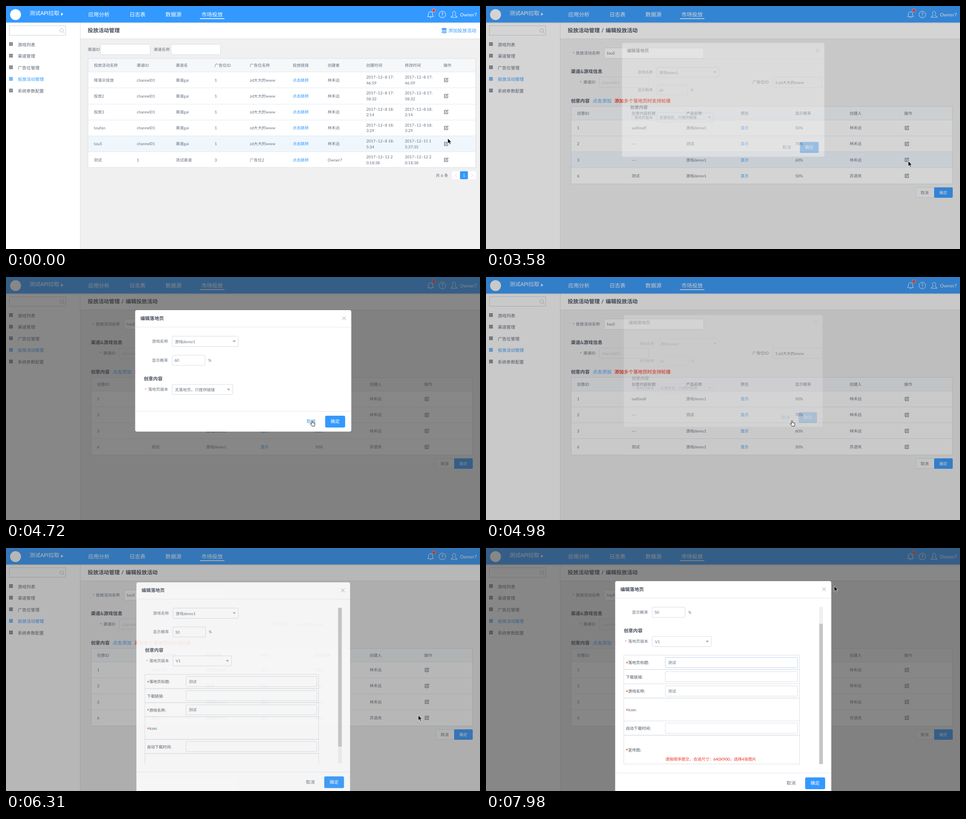
Animation of 1044 by 536 pixels, one loop 8000 ms. Source, as an HTML page:

```html
<!DOCTYPE html>
<html lang="zh-CN">
<head>
<meta charset="utf-8">
<title>投放活动管理</title>
<style>
html, body { margin: 0; width: 100%; height: 100%; overflow: hidden; background: #f0f0f0; }
svg { display: block; width: 1044px; height: 536px; }
text { font-family: Lato, "Noto Sans CJK SC", "Noto Sans CJK", sans-serif; text-rendering: geometricPrecision; white-space: pre; }
</style>
</head>
<body>
<svg id="stage" viewBox="0 0 1044 536" xmlns="http://www.w3.org/2000/svg"></svg>
<script>
const BLUE = '#3399ff', INK = '#657180', DARK = '#464c5b', LINE = '#d7dde4', RED = '#f0321e';
const S = 8.82, M = 10.3, L = 11.76, ROW = 35.2;

// y is the vertical middle of the line
const text = (x, y, s, fill = INK, size = S, weight = 400, extra = '') =>
  `<text x="${x}" y="${(y + size * .38).toFixed(2)}" font-size="${size}" font-weight="${weight}" fill="${fill}" ${extra}>${s}</text>`;
const rect = (x, y, x2, y2, fill, extra = '') =>
  `<rect x="${x}" y="${y}" width="${x2 - x}" height="${y2 - y}" fill="${fill}" ${extra}/>`;
const box = (x, y, x2, y2, fill = '#fff', id = '') =>
  rect(x + .5, y + .5, x2 - .5, y2 - .5, fill, `rx="2" stroke="${LINE}" ${id && `id="${id}"`}`);
const path = (d, stroke, w = 1, extra = '') =>
  `<path d="${d}" fill="none" stroke="${stroke}" stroke-width="${w}" ${extra}/>`;
const hline = (x, x2, y, c = LINE) => path(`M${x} ${y}H${x2}`, c);
const group = (id, inner) => `<g id="${id}">${inner}</g>`;
const star = (x, y, size = S) => text(x, y + 1, '*', RED, size);
const bold = (x, y, s, size = M) => text(x, y, s, DARK, size, 700);
const caret = (x, y) => `<path d="M${x - 3.5} ${y - 2}h7l-3.5 4z" fill="#9ea7b4"/>`;
const editIcon = (x, y) =>
  path('M1 -3.5H-4V4H3.5V.2M-1.4 1.4L-.9 -.6L3.4 -4.6L4.7 -3.3L.6 1Z', '#495060', 1, `transform="translate(${x} ${y})"`);

function cell(x, y, s) {
  if (s === '@') return editIcon(x + 6, y);
  if (s.includes('|')) return s.split('|').map((p, i) => text(x, y - 6.3 + i * 12.6, p)).join('');
  return text(x, y, s, s === '点击跳转' || s === '显示' ? BLUE : INK);
}

function table(x, x2, y, cols, names, rows, mark) {
  const head = 30.3, top = y + head, end = top + rows.length * ROW;
  let out = rect(x, y, x2, end, '#fff') + rect(x, y, x2, top, '#f5f7f9') + mark;
  names.forEach((n, i) => out += text(cols[i], y + head / 2 + .3, n));
  rows.forEach((r, j) => {
    out += hline(x, x2, Math.floor(top + j * ROW) + .5, '#e3e8ee');
    r.forEach((s, i) => out += cell(cols[i], top + (j + .5) * ROW, s));
  });
  return out + rect(x + .5, y + .5, x2 - .5, Math.floor(end) + .5, 'none', `stroke="${LINE}"`);
}

function header() {
  let out = rect(0, 36.5, 1044, 39, '#000', 'opacity=".05"') + rect(0, 0, 1044, 36.5, BLUE);
  out += '<circle cx="21" cy="19" r="12" fill="#fff"/>';
  out += text(52, 16, '测试API拉取', '#fff', L, 500) + '<path d="M121.5 14.5l4.5 3.5-4.5 3.5z" fill="#fff"/>';
  let x = 181;
  for (const s of ['应用分析', '日志表', '数据源', '市场投放']) {
    out += text(x, 18.8, s, '#fff', L, 500);
    x += s.length * L + 44;
  }
  out += rect(427, 27, 481, 28.6, '#fff');
  out += path('M928.5 23.5H941.5Q939.5 22 939.5 17Q939.5 13 935 12.5Q930.5 13 930.5 17Q930.5 22 928.5 23.5ZM933.5 25.5H936.5', '#fff');
  out += '<circle cx="942.3" cy="9.8" r="3.6" fill="#f5372c" stroke="#fff" stroke-width=".6"/>';
  out += '<circle cx="961" cy="18.8" r="7.3" fill="none" stroke="#fff"/>' + text(958.4, 18.8, '?', '#fff', 11.5);
  out += path('M987 12C982 12 983.5 19 985 20.5Q985 21.5 981 23Q980.5 24 980.5 25H993.5Q993.5 24 993 23Q989 21.5 989 20.5C990.5 19 992 12 987 12Z', '#fff');
  return out + text(1000, 18.8, 'Owner7', '#fff', M);
}

function sidebar() {
  let out = rect(0, 36.5, 163, 536, '#fff') + path('M163.5 36.5V536', '#dcdfe3');
  out += rect(7.5, 43.5, 131.5, 64.5, '#fff', 'stroke="#cfd3d8"');
  out += path('M126 57L128.5 60M122.5 50A3.9 3.9 0 1 0 122.6 50', '#b5bac2');
  ['游戏列表', '渠道管理', '广告位管理', '投放活动管理', '系统参数配置'].forEach((s, i) => {
    const y = 85 + i * 25.6, c = i === 3 ? BLUE : '#555d6a';
    for (let k = 0; k < 9; k++) {
      const gx = 7 + k % 3 * 2.8, gy = y - 5 + Math.floor(k / 3) * 2.8;
      out += rect(gx, gy, gx + 2.3, gy + 2.3, c);
    }
    out += text(26, y, s, i === 3 ? BLUE : '#5b6472', 9.55);
  });
  return out;
}

const titleBar = rect(164, 36.5, 1044, 72, '#fff') + hline(164, 1044, 72.5, '#dcdfe3') + bold(180, 54, '投放活动管理', L);

function listPage() {
  const d = s => `2017–12–${s}`;
  const row = (name, made, changed = made) =>
    [name, 'channel01', '渠道gai', '1', 'zd大大的www', '点击跳转', '林禾远', d(made), d(changed), '@'];
  let out = titleBar + `<ellipse cx="965.1" cy="50" rx="5.3" ry="1.6" fill="${BLUE}"/>`;
  for (let i = 0; i < 3; i++)
    out += `<path d="M959.8 ${50 + i * 3.3}q5.3 3.4 10.6 0v1.8q-5.3 3.4-10.6 0z" fill="${BLUE}"/>`;
  out += text(974, 54.3, '添加投放活动', BLUE, M);
  out += text(180, 96, '渠道ID') + box(208, 84, 318, 108) + text(325.5, 96, '渠道名称') + box(363, 84, 473, 108);
  out += table(180, 1035, 115.3, [193.5, 288, 374, 459.5, 537, 631.5, 708.5, 793.5, 878.5, 963.5],
    ['投放活动名称', '渠道ID', '渠道名', '广告位ID', '广告位名称', '投放链接', '创建者', '创建时间', '修改时间', '操作'], [
      row('降落伞投放', '8 17:|46:59'),
      row('投放2', '8 17:|58:32'),
      row('投放3', '8 18:|2:14'),
      row('toufan', '8 18:|3:29'),
      row('tou5', '8 18:|5:34', '11 1|5:37:35'),
      ['测试', '1', '测试渠道', '3', '广告位2', '点击跳转', 'Owner7', d('12 2|0:18:38'), d('12 2|0:18:38'), '@']
    ], rect(180, 287, 1035, 322, '#eff7fd'));
  out += text(946.5, 373.5, '共 6 条');
  [982, 1000, 1018].forEach((x, i) => out += rect(x, 364.5, x + 17.3, 382, i === 1 ? BLUE : '#fff', 'rx="2"'));
  return out + text(1006.3, 373.5, '1', '#fff') + path('M992.5 370l-3 3.5 3 3.5M1025 370l3 3.5-3 3.5', '#c3cbd6', .9);
}

function editPage() {
  let out = titleBar + bold(254, 54, '/', L) + bold(263.5, 54, '编辑投放活动', L);
  out += star(191, 103.5) + text(198, 103.5, '投放活动名称') + box(260, 92, 480, 116) + text(266, 104, 'tou5');
  out += bold(187, 144.5, '渠道&amp;游戏信息');
  out += star(207, 168) + text(214.5, 168, '渠道ID') + box(249, 156, 359, 180, '#f0f0f0') + text(255, 168.5, 'channel01', '#c8ccd2');
  out += text(587, 168, '广告位ID') + box(631, 156, 741, 180, '#f0f0f0') + text(637, 169, '1:zd大大的www');
  out += bold(187, 209, '创意内容') + text(235, 209, '点击添加', BLUE, M) +
    text(283, 209, '添加多个落地页时支持轮播', RED, M, 700);
  const names = ['创意ID', '创意内容标题', '产品名称', '预览', '显示概率', '创建人', '操作'];
  const row = (id, title, prod, pct, who = '林禾远') => [id, title, prod, '显示', pct, who, '@'];
  out += table(187, 1028, 221, names.map((_, i) => 200.5 + i * 120.1), names, [
    row('1', 'sadfasdf', '游戏demo1', '50%'),
    row('2', '––', '测试', '70%'),
    row('3', '––', '游戏demo1', '60%'),
    row('6', '测试', '游戏demo1', '50%', '苏语岚')
  ], rect(188, 0, 1027, ROW, '#eff7fd', 'id="hover"'));
  return out + box(946, 400, 988, 423, '#f5f6f7') + text(957.5, 411.5, '取消') +
    rect(987, 400, 1028, 423, BLUE, 'rx="2"') + text(998.5, 411.5, '确定', '#fff');
}

function dialog(bottom, id) {
  const y = bottom - 45;
  return rect(284.5, 73, 760.5, bottom, '#fff', 'rx="4"') + bold(296, 91, '编辑落地页') +
    path('M740.5 87l8 8M748.5 87l-8 8', '#999') + hline(284.5, 760.5, 110.5, '#e3e8ee') + hline(284.5, 760.5, y + .5, '#e3e8ee') +
    text(662, y + 22.5, '取消', INK, 10, 400, `id="${id}"`) +
    rect(703, y + 10, 747, y + 36, BLUE, 'rx="3"') + text(715, y + 22.5, '确定', '#fff', 10);
}

const fields = (pct, version, right, id) =>
  text(321.5, 141.5, '游戏名称') + box(365.5, 130, 512, 154) + text(372, 142.5, '游戏demo1') + caret(502.5, 142) +
  text(321.5, 183.5, '显示概率') + box(365.5, 172, 439, 195.5) + text(371, 184, pct) + text(445.5, 183.5, '%') +
  bold(303.5, 224.5, '创意内容') +
  star(306, 248) + text(313, 248, '落地页版本') + box(365.5, 236.5, right, 260, '#fff', id) +
  text(372, 248.5, version) + caret(right - 9.7, 248.5);

function longForm() {
  let out = fields('50', 'V1', 497, 'pick'), y = 278;
  // rows without a value hold pictures and are taller
  const row = (label, must, value, h = 31.5, id = '') => {
    const mid = y + h / 2 + 1.2;
    out += rect(303.5, y + .5, 690.5, y + h + .5, 'none', 'stroke="#dcdfe4"');
    if (must) out += star(307.5, mid + 1.5, 14);
    out += text(must ? 313 : 308, mid, label + ':', '#4d5563');
    if (value !== null) out += box(394.5, mid - 12.2, 687, mid + 11.3, '#fff', id) + text(401, mid - .5, value);
    y += h;
  };
  row('落地页标题', true, '测试', 31.5, 'name');
  row('下载链接', false, '');
  row('游戏名称', true, '测试');
  row('icon', true, null, 50.5);
  row('自动下载时间', false, '');
  row('宣传图', true, null, 63.5);
  return out + text(395, y - 10.5, '请按顺序提交，合适尺寸：640X900，选择4张图片', RED, S, 500);
}

const arrow = '<path id="arrow" d="M0 0V11.5L2.7 9L4.6 13.2L6.5 12.3L4.7 8.3H8.2Z" fill="#000" stroke="#fff" stroke-width=".8"/>';
const hand = '<path id="hand" d="M-1.1 .7Q0 -1.6 1.1 .7V4.3L5 5.1Q6.5 5.5 6.4 7.3L5.5 12H0L-3.4 7.5Q-3.6 6 -2.3 6.2L-1.1 7.4Z" fill="#fff" stroke="#000" stroke-width=".9"/>';

stage.innerHTML =
  '<clipPath id="view"><rect x="285" y="130" width="449" height="347"/></clipPath>' +
  rect(0, 0, 1044, 536, '#f0f0f0') + group('list', listPage()) + group('edit', editPage()) + sidebar() + header() +
  rect(0, 0, 1044, 536, '#373737', 'id="mask"') +
  group('short', dialog(341, 'cancel') + fields('60', '无落地页，只提供链接', 500, 'pick0')) +
  group('long', dialog(541, 'cancel2') + `<g clip-path="url(#view)">${group('scroll', longForm())}</g>` +
    rect(734, 130, 742, 476.5, '#f0f0f0') + rect(734, 130, 742, 439.5, '#c6c6c6', 'id="thumb"')) +
  group('cursor', arrow + hand);

const TICK = 87.3; // the screen refreshes at this pace
const clamp = v => Math.min(1, Math.max(0, v));
const smooth = v => (v = clamp(v)) * v * (3 - 2 * v);

const stops = [[0, 973, 292], [80, 970, 294], [560, 970, 294], [820, 312, 250], [2630, 498, 303], [3140, 930, 342],
  [3880, 930, 342], [4710, 674, 317], [4980, 674, 317], [5150, 895, 384], [5930, 908, 369], [6310, 908, 369],
  [6460, 470, 250], [7640, 470, 250], [7940, 767, 84]];

function mouse(t) {
  if (t > 820 && t < 2630) { // sweeping over the table
    const a = (t - 820) / 1530 * 2 * Math.PI;
    return [628 - 316 * Math.cos(a), 250 - 54 * Math.sin(1.5 * a)];
  }
  const i = stops.findIndex(s => s[0] > t);
  if (i < 0) return stops[stops.length - 1].slice(1);
  const [t0, x0, y0] = stops[i - 1], [t1, x1, y1] = stops[i], f = (t - t0) / (t1 - t0);
  return [x0 + (x1 - x0) * f, y0 + (y1 - y0) * f];
}

// [dialog, mask] visibility: a few quick steps, a short stall, then the end state
function opening(u) {
  if (u < 0) return [0, 0];
  if (u >= 380) return [1, 1];
  const dim = (Math.min(2, Math.floor(u / 80)) + .5) / 4.2;
  return [smooth(1.55 * dim ** 1.3), dim];
}
function closing(u) {
  if (u >= 290) return [0, 0];
  const dim = 1 - (Math.min(1, Math.floor(u / 80)) + .5) / 2.7;
  return [dim * dim, dim];
}

const $ = id => document.getElementById(id);
const set = (id, name, v) => $(id).setAttribute(name, v);
const show = (id, on) => $(id).style.display = on ? '' : 'none';

function draw(now) {
  const t = Math.floor(now / TICK) * TICK;
  const [x, y] = mouse(t);
  const [open, dim] = now < 4900 ? opening(now - 3500) : now < 6140 ? closing(now - 4900) : opening(now - 6140);
  show('list', now < 300);
  show('edit', now >= 300);

  const row = Math.floor((y - 254) / ROW);
  show('hover', row >= 0 && row < 4 && open < .5 && (now < 4900 || now >= 5400));
  set('hover', 'y', 251.5 + row * ROW);

  set('mask', 'opacity', dim * .6);
  const first = now < 6140, id = first ? 'short' : 'long', cy = first ? 207 : 307;
  show('short', first && open > 0);
  show('long', !first);
  set(id, 'opacity', open);
  set(id, 'transform', `translate(522.5 ${cy}) scale(${.9 + .1 * open}) translate(-522.5 ${-cy})`);

  const down = clamp((t - 6840) / 300), point = now >= 4630 && now < 5190;
  set('cancel', 'fill', point ? BLUE : INK);
  set('pick', 'stroke', now >= 6730 && down === 0 ? '#5cadff' : LINE);
  set('name', 'stroke', down === 1 ? (now < 7900 ? '#5cadff' : '#b5d0ee') : LINE);
  set('scroll', 'transform', `translate(0 ${-42 * down})`);
  set('thumb', 'transform', `translate(0 ${37 * down})`);

  set('cursor', 'transform', `translate(${x} ${y})`);
  show('arrow', !point);
  show('hand', point);
}

const start = performance.now();
function loop() {
  draw((performance.now() - start) % 8000);
  requestAnimationFrame(loop);
}
loop();
</script>
</body>
</html>
```
